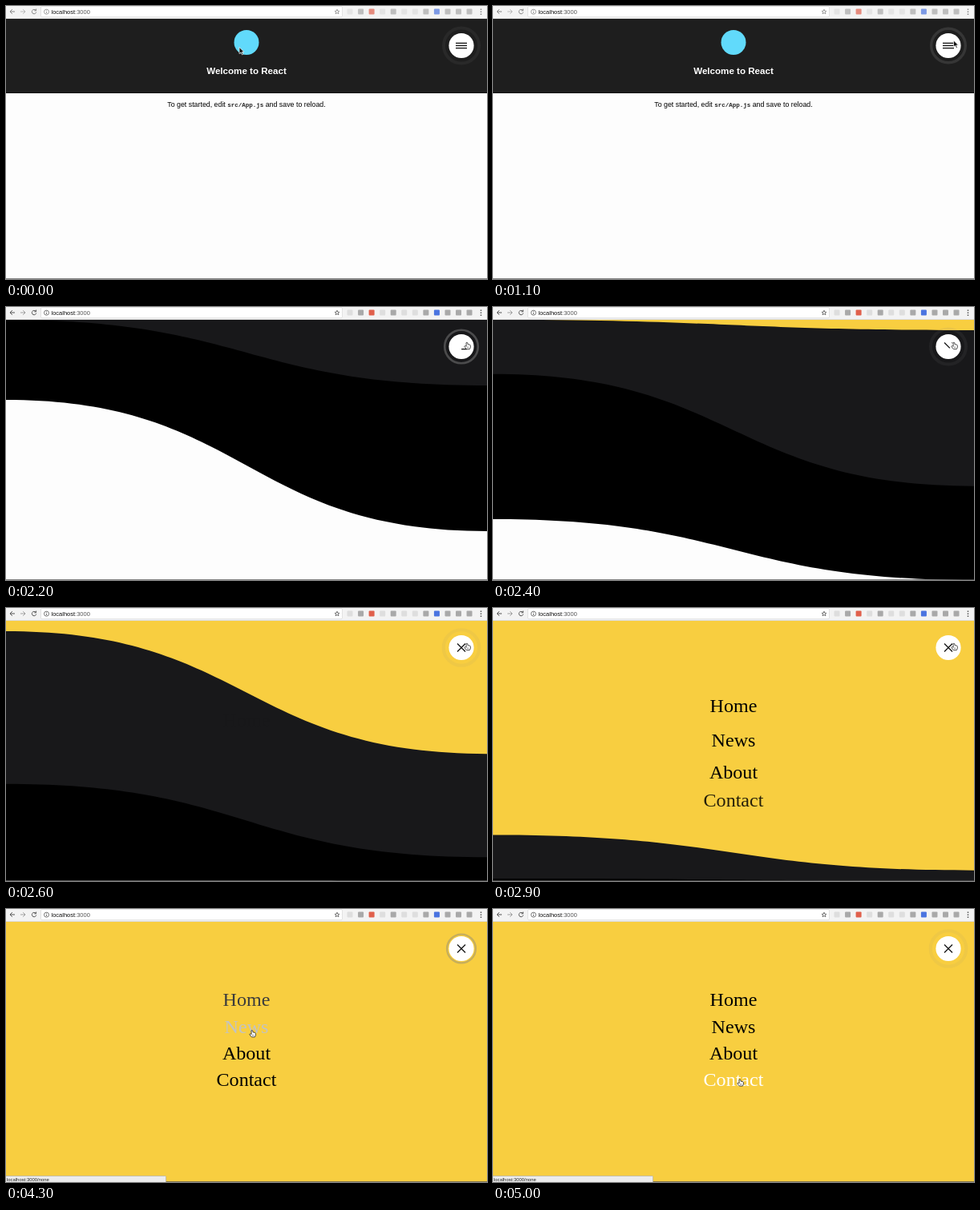
Animation of 600 by 341 pixels, one loop 5.1 s. Source, as an HTML page:

```html
<!DOCTYPE html>
<html lang="en">
<head>
<meta charset="utf-8">
<title>Overlay menu</title>
<style>
  html, body { margin: 0; width: 100%; height: 100%; overflow: hidden; background: #fdfdfd; }
  svg { display: block; width: 100vw; height: 100vh; }
  text { font-family: "Liberation Sans", Arial, sans-serif; }
  .mid { text-anchor: middle; }
  .code { font: bold 7.5px "Liberation Mono", monospace; fill: #222; }
  #menu text { font: 24.1px "Liberation Serif", "Times New Roman", serif; text-anchor: middle; }
  .line { fill: none; stroke: #111; stroke-width: 1.3; }
  .tool { fill: none; stroke: #555; stroke-width: 1; }
  .thin { stroke-width: .8; }
</style>
</head>
<body>
<svg viewBox="0 0 600 341">
  <rect width="600" height="341" fill="#fdfdfd"/>
  <rect y="16" width="600" height="93" fill="#1e1e1e"/>
  <rect y="108" width="600" height="1" fill="#121212"/>
  <circle cx="300" cy="45.5" r="15.5" fill="#61dafb"/>
  <text class="mid" x="300" y="85" font-size="11.6" font-weight="bold" fill="#fff">Welcome to React</text>
  <text class="mid" x="300" y="125.7" font-size="8.82">To get started, edit <tspan class="code">src/App.js</tspan> and save to reload.</text>

  <g id="waves"></g>
  <g id="menu"></g>
  <rect y="340" width="600" height="1" fill="#555" opacity=".7"/>

  <circle id="ring" cx="568" cy="49.5" fill="none" stroke="#828282"/>
  <circle cx="568" cy="49.5" r="15.6" fill="#fff"/>
  <g id="icon"></g>

  <g id="status">
    <rect x="-1" y="333.5" width="200.5" height="8" rx="1" fill="#ececec" stroke="#aaa" stroke-width=".6"/>
    <text x="1" y="339.5" font-size="5.9" fill="#222">localhost:3000/none</text>
  </g>

  <rect width="600" height="16" fill="#f3f3f3"/>
  <rect y="15" width="600" height="1" fill="#dcdcdc"/>
  <rect x="43.5" y=".5" width="376" height="13.2" rx="1.5" fill="#fff" stroke="#d8d8d8" stroke-width=".7"/>
  <text x="56.5" y="9.8" font-size="7.5" fill="#111">localhost<tspan fill="#555">:3000</tspan></text>
  <g id="tools">
    <path class="tool" d="M11 7H5M7.8 4.2L5 7L7.8 9.8"/>
    <path class="tool" d="M18 7H24M21.2 4.2L24 7L21.2 9.8" opacity=".5"/>
    <path class="tool" d="M37 5.2A2.7 2.7 0 1 0 37.7 7.6M37.6 3.6V5.8H35.4"/>
    <circle class="tool thin" cx="50.5" cy="7.2" r="3"/>
    <path class="tool thin" d="M50.5 6.8V9M50.5 5.2V6"/>
    <path class="tool thin" d="M413 4.2L413.8 6.2L415.9 6.4L414.3 7.7L414.9 9.8L413 8.6L411.1 9.8L411.7 7.7L410.1 6.4L412.2 6.2Z"/>
    <g id="badges"></g>
    <path d="M592.5 3.4v1.6M592.5 6.4v1.6M592.5 9.4v1.6" stroke="#555" stroke-width="1.5"/>
  </g>

  <g id="arrow">
    <path d="M0 0V8.2L2 6.4L3.4 9.4L4.8 8.7L3.4 5.9H6Z" fill="#111" stroke="#fff" stroke-width=".7"/>
  </g>
  <g id="hand">
    <path d="M-1 -3.4Q0 -4.3 .8 -3.2L1.2 -1.2Q4.4 -1.6 4.4 .4V2.6L3.4 4.6H-.6L-3.2 1.4Q-3 .2 -1.6 .8L-.8 1.2Z" fill="#fff" stroke="#222" stroke-width=".8"/>
    <path d="M.6 1.6V3.2M2 1.6V3.2" stroke="#222" stroke-width=".5"/>
  </g>
</svg>
<script>
const LOOP = 5100, TOP = 16, SPAN = 325;
const $ = id => document.getElementById(id);
const clamp = v => Math.max(0, Math.min(1, v));
const ramp = (t, start, dur) => clamp((t - start) / dur);
const inOut = u => u < .5 ? 2 * u * u : 1 - 2 * (1 - u) ** 2;
const out = u => 1 - (1 - u) ** 1.6;

function add(parent, name, attrs, text = "") {
  const el = document.createElementNS("http://www.w3.org/2000/svg", name);
  for (const k in attrs) el.setAttribute(k, attrs[k]);
  el.textContent = text;
  return parent.appendChild(el);
}

// Interpolates rows of [key, ...values]
function track(rows, key, ease = u => u) {
  let i = 0;
  while (i < rows.length - 2 && key >= rows[i + 1][0]) i++;
  const [a, b] = [rows[i], rows[i + 1]];
  const u = ease(clamp((key - a[0]) / (b[0] - a[0])));
  return a.slice(1).map((v, k) => v + (b[k + 1] - v) * u);
}

// Each edge: [start, duration]
const waves = [
  { fill: "#000", left: [2096, 511], right: [1840, 557] },
  { fill: "#18181a", left: [2317, 617], right: [2092, 656] },
  { fill: "#f8ce40", left: [2589, 472], right: [2386, 596] }
];
for (const w of waves) w.el = add($("waves"), "path", { fill: w.fill });

const links = [
  ["Home", 3620, 4110], ["News", 4110, 4400], ["About", 4400, 4600], ["Contact", 4600, 9000]
].map(([label, over, leave], i) => ({
  over, leave, start: 2710 + 65 * i, y: 121.3 + 33.2 * i,
  el: add($("menu"), "text", { x: 300 }, label)
}));

const bars = [46.4, 49.5, 52.6].map((y, i) => ({ y, start: 1880 + 100 * i, el: add($("icon"), "path", { class: "line" }) }));
const cross = [1, -1].map((dir, i) => ({ dir, start: 2280 + 90 * i, el: add($("icon"), "path", { class: "line" }) }));

const tints = { 2: "#e0604c", 8: "#4a74e0" };
for (let i = 0; i < 12; i++) {
  const faint = i === 0 || i === 3 || i === 5 || i === 6;
  add($("badges"), "rect", {
    x: 425.5 + 13.55 * i, y: 3.5, width: 7, height: 7, rx: 1,
    fill: tints[i] || (faint ? "#dedede" : "#a9a9a9")
  });
}

// Phase, radius, opacity, width
const ringSteps = [
  [0, 15, 0, 2], [.2, 18.5, .5, 2.4], [.42, 20.8, .48, 2.7], [.5, 21.3, .24, 3.4],
  [.583, 22, .11, 4], [.75, 22.3, .08, 4], [1, 23, 0, 4]
];
const cursorSteps = [
  [0, 291, 51.5], [650, 291, 51.5], [1050, 574.5, 43], [1150, 574.5, 43], [1300, 575, 48],
  [3100, 575, 48], [3500, 309, 114], [3600, 307, 119], [3850, 307, 119], [4110, 307, 130],
  [4400, 307, 163], [4600, 308, 196], [4760, 308, 214], [5100, 308, 217]
];

function draw(t) {
  for (const { el, left, right } of waves) {
    const [a, b] = [left, right].map(e => TOP + SPAN * out(ramp(t, ...e)));
    el.setAttribute("d", `M0 ${TOP}V${a}C300 ${a} 300 ${b} 600 ${b}V${TOP}Z`);
  }

  for (const { el, over, leave, start, y } of links) {
    el.setAttribute("y", y + 27 * (1 - inOut(ramp(t, start, 320))));
    el.setAttribute("opacity", ramp(t, start - 110, 125));
    const c = Math.round(255 * (ramp(t, over, 250) - ramp(t, leave, 250)));
    el.setAttribute("fill", `rgb(${c},${c},${c})`);
  }

  for (const { el, y, start } of bars) {
    const u = inOut(ramp(t, start, 240));
    el.setAttribute("d", u < 1 ? `M${561 + 14 * u} ${y}H575` : "");
  }
  for (const { el, dir, start } of cross) {
    const u = inOut(ramp(t, start, 200));
    const x = 568 - 5 * dir;
    el.setAttribute("d", u > 0 ? `M${x} 44.5l${10 * dir * u} ${10 * u}` : "");
  }

  const [r, alpha, width] = track(ringSteps, (t + 700) % 1200 / 1200);
  $("ring").setAttribute("r", r);
  $("ring").setAttribute("opacity", alpha);
  $("ring").setAttribute("stroke-width", width);

  const [x, y] = track(cursorSteps, t, inOut);
  const isHand = t >= 1200 && t < 3150 || t >= 3500;
  for (const id of ["arrow", "hand"]) {
    $(id).setAttribute("transform", `translate(${x} ${y})`);
    $(id).setAttribute("visibility", (id === "hand") === isHand ? "visible" : "hidden");
  }

  $("tools").setAttribute("opacity", t < 1200 ? .7 : 1);
  $("status").setAttribute("visibility", t >= 3700 ? "visible" : "hidden");
}

function tick() {
  draw(performance.now() % LOOP);
  requestAnimationFrame(tick);
}
tick();
</script>
</body>
</html>
```
